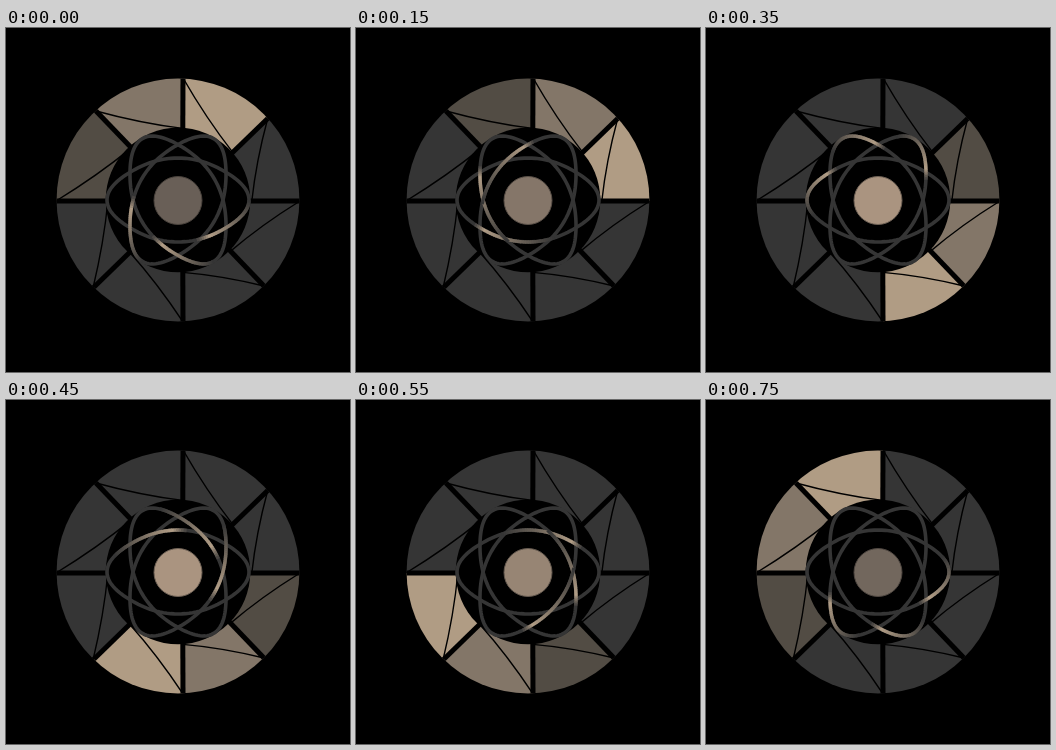
An HTML page with a canvas that plays this animation: 344x344 px, repeating every 0.8 s.

```html
<!DOCTYPE html>
<html lang="en">
<head>
<meta charset="utf-8">
<title>Atom loader</title>
<style>
  html, body { margin: 0; width: 100%; height: 100%; overflow: hidden; background: #000; }
  canvas { display: block; width: 344px; height: 344px; }
</style>
</head>
<body>
<canvas id="stage" width="344" height="344"></canvas>
<script>
const ctx = document.getElementById('stage').getContext('2d');
const LOOP = 800, STEP = 50, TAU = Math.PI * 2, DEG = Math.PI / 180;
const CENTER = 172;
const BASE = [53, 53, 53], SAND = [177, 157, 134];
const BASE_FILL = `rgb(${BASE})`;
const TRAIL = ['#b09c84', '#837668', '#524c44'];
const HUB = [176.5, 173];

// Outer ends of the gaps between blades, clockwise from the top.
const RIM = [[177, 50], [261.7, 90.5], [294, 173], [258, 258],
             [177, 294], [87, 260], [50, 173], [90, 83]];

const along = (p, k) => HUB.map((h, i) => h + (p[i] - h) * k);
const mix = (c, d, k) => `rgb(${c.map((v, i) => Math.round(v + (d[i] - v) * k))})`;

function disc(x, y, r, fill) {
  ctx.beginPath();
  ctx.arc(x, y, r, 0, TAU);
  ctx.fillStyle = fill;
  ctx.fill();
}

function stroke(width, color) {
  ctx.lineWidth = width;
  ctx.strokeStyle = color;
  ctx.stroke();
}

function drawBlades(lead) {
  ctx.save();
  ctx.beginPath();
  ctx.arc(CENTER, CENTER, 121.4, 0, TAU);
  ctx.clip();
  RIM.forEach((p, i) => {
    ctx.beginPath();
    ctx.moveTo(...HUB);
    ctx.lineTo(...along(p, 1.5));
    ctx.lineTo(...along(RIM[(i + 1) % 8], 1.5));
    ctx.fillStyle = TRAIL[(lead - i + 8) % 8] || BASE_FILL;
    ctx.fill();
  });
  RIM.forEach((p, i) => {
    ctx.beginPath();
    ctx.moveTo(...HUB);
    ctx.lineTo(...along(p, 1.1));
    stroke(5, '#000');

    const end = along(RIM[(i + 1) % 8], 0.59);
    const bend = p.map((v, j) => {
      const mid = (v + end[j]) / 2;
      return mid + (CENTER - mid) * 0.045;
    });
    ctx.beginPath();
    ctx.moveTo(...p);
    ctx.quadraticCurveTo(...bend, ...end);
    stroke(1.4, '#000');
  });
  ctx.restore();
  disc(CENTER, CENTER, 72.3, '#000');
}

// An ellipse drawn in slightly at its diagonals, so its ends are more pointed.
function orbitPoint(angle, tilt) {
  const pinch = 1 - 0.055 * Math.sin(2 * angle) ** 2;
  const x = 71 * pinch * Math.cos(angle), y = 42 * pinch * Math.sin(angle);
  const c = Math.cos(tilt), s = Math.sin(tilt);
  return [CENTER + x * c - y * s, CENTER + x * s + y * c];
}

function orbitArc(from, to, tilt, steps) {
  ctx.beginPath();
  for (let i = 0; i <= steps; i++) {
    ctx.lineTo(...orbitPoint(from + (to - from) * i / steps, tilt));
  }
}

function drawOrbits(peak) {
  const tilts = [0, 60 * DEG, 120 * DEG];
  for (const tilt of tilts) {
    orbitArc(0, TAU, tilt, 120);
    stroke(3.6, BASE_FILL);
  }
  const tail = 62, nose = 12, step = 2;
  for (const tilt of tilts) {
    for (let d = -tail; d < nose; d += step) {
      const glow = d < 0 ? 1 + d / tail : 1 - d / nose;
      orbitArc(peak + d * DEG, peak + (d + step + 0.5) * DEG, tilt, 1);
      stroke(3.4, mix(BASE, SAND, glow));
    }
  }
}

function drawCore(glow) {
  disc(CENTER, 172.5, 24, mix([105, 95, 87], [179, 156, 134], glow));
  stroke(1, mix([74, 67, 61], [116, 102, 89], glow));
}

function draw(t) {
  ctx.fillStyle = '#000';
  ctx.fillRect(0, 0, 344, 344);
  drawBlades(Math.floor(t / 100));
  drawOrbits(t / LOOP * TAU + 62 * DEG);
  drawCore(1 - Math.abs(t - LOOP / 2) / (LOOP / 2));
}

const start = performance.now();
function tick() {
  const t = (performance.now() - start) % LOOP;
  draw(Math.floor(t / STEP) * STEP);
  requestAnimationFrame(tick);
}
tick();
</script>
</body>
</html>
```
